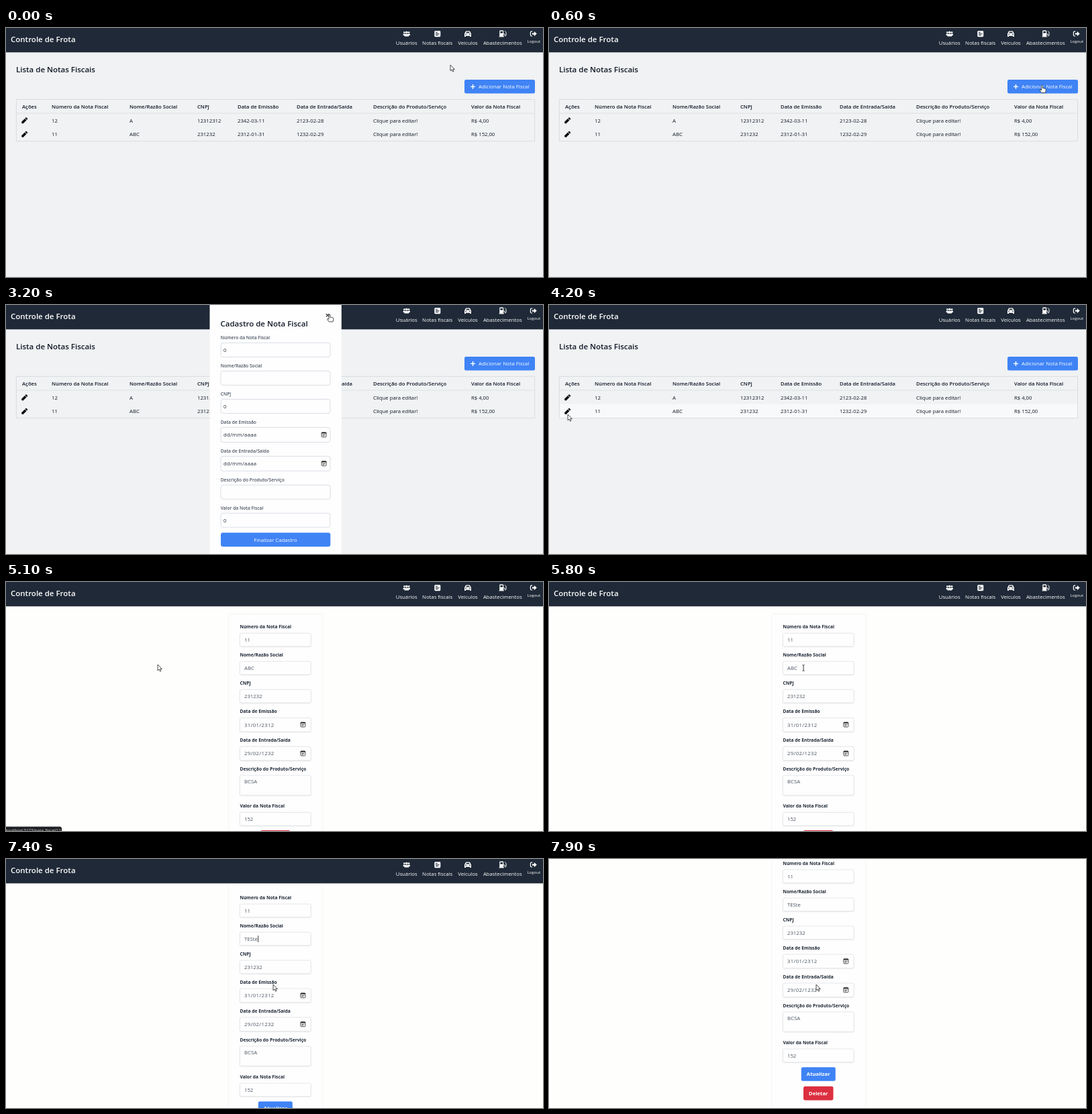
Recreate the animation shown at these times as an HTML page with a canvas. Size 800 by 371 pixels, loop 8 s.

```html
<!DOCTYPE html>
<html lang="pt-BR">
<head>
<meta charset="utf-8">
<title>Controle de Frota</title>
<style>
html, body { margin: 0; width: 100%; height: 100%; overflow: hidden; background: #f0f2f3; }
canvas { display: block; width: 800px; height: 371px; }
</style>
</head>
<body>
<canvas id="stage" width="800" height="371"></canvas>
<script>
const c = document.getElementById('stage').getContext('2d');
const LOOP = 8000, STEP = 100;
const OPEN = 700, CLOSE = 3400, EDIT = 5000, DIRTY = 6300;
const INK = '#111827', NAVY = '#1f2937', BLUE = '#3f83f5', RED = '#dc2f40', GREY = '#4b5563';

const LABELS = ['Número da Nota Fiscal', 'Nome/Razão Social', 'CNPJ', 'Data de Emissão',
  'Data de Entrada/Saída', 'Descrição do Produto/Serviço', 'Valor da Nota Fiscal'];
const COLS = [24, 68, 184, 285, 345, 433, 547, 693];
const ROWS = [
  ['12', 'A', '12312312', '2342-03-11', '2123-02-28', 'Clique para editar!', 'R$ 4,00'],
  ['11', 'ABC', '231232', '2312-01-31', '1232-02-29', 'Clique para editar!', 'R$ 152,00']
];

// time, x, y, pointer shape
const POINTER = [
  [0, 662, 55, 'arrow'], [400, 733, 84, 'hand'], [700, 735, 86, 'arrow'], [900, 690, 112, 'arrow'],
  [1600, 384, 259, 'arrow'], [1800, 380, 296, 'arrow'], [2000, 380, 296, 'arrow'],
  [2300, 400, 325, 'arrow'], [2700, 440, 190, 'arrow'], [3000, 442, 180, 'arrow'],
  [3200, 482, 14, 'hand'], [3400, 482, 14, 'arrow'], [3800, 70, 135, 'arrow'],
  [4200, 28, 163, 'arrow'], [4300, 28, 157, 'hand'], [4900, 28, 157, 'arrow'],
  [5100, 226, 123, 'arrow'], [5600, 388, 128, 'ibeam'], [5900, 376, 128, 'ibeam'],
  [6100, 300, 130, 'arrow'], [6300, 351, 155, 'ibeam'], [6400, 354, 161, 'ibeam'],
  [6800, 357, 164, 'ibeam'], [7100, 390, 180, 'arrow'], [7400, 398, 187, 'arrow']
];
const TYPING = [[0, 'ABC'], [DIRTY, 'T'], [6800, 'TE'], [6900, 'TES'], [7100, 'TESt'], [7300, 'TESte']];
const SCROLL = [[0, 0], [7700, 17], [7800, 38], [7900, 51]];

const latest = (list, t) => list.filter(k => k[0] <= t).pop();

function pointerAt(t) {
  const a = latest(POINTER, t), b = POINTER[POINTER.indexOf(a) + 1] || a;
  const p = (t - a[0]) / (b[0] - a[0] || 1), e = p * p * (3 - 2 * p);
  return { x: a[1] + (b[1] - a[1]) * e, y: a[2] + (b[2] - a[2]) * e, shape: a[3] };
}

function text(s, x, y, { size = 7.75, weight = 400, color = INK, align = 'left', gap = 0 } = {}) {
  c.font = `${weight} ${size}px "Open Sans", "Noto Sans", sans-serif`;
  c.letterSpacing = gap + 'px';
  c.textAlign = align;
  c.fillStyle = color;
  c.fillText(s, x, y + size * 0.36);
}

function rect(x, y, w, h, color) {
  c.fillStyle = color;
  c.fillRect(x, y, w, h);
}

function box(x, y, w, h, r, fill, line) {
  c.beginPath();
  c.roundRect(x, y, w, h, r);
  if (fill) { c.fillStyle = fill; c.fill(); }
  if (line) { c.strokeStyle = line; c.lineWidth = 0.8; c.stroke(); }
}

function dot(x, y, r, color = '#fff') {
  c.fillStyle = color;
  c.beginPath();
  c.arc(x, y, r, 0, 7);
  c.fill();
}

function shape(d, x, y, fill, line, width = 0.8) {
  const path = new Path2D(d);
  c.save();
  c.translate(x, y);
  if (fill) { c.fillStyle = fill; c.fill(path); }
  if (line) { c.strokeStyle = line; c.lineWidth = width; c.stroke(path); }
  c.restore();
}

function navIcons() {
  for (const [x, r] of [[593.4, 1.3], [600.2, 1.3], [596.8, 1.9]]) dot(x, 6.6, r);
  box(591.6, 8.5, 3.2, 2.6, [1.4, 1, 0, 0], '#fff');
  box(598.8, 8.5, 3.2, 2.6, [1, 1.4, 0, 0], '#fff');
  box(593.4, 9, 6.8, 3.6, [2, 2, 0.6, 0.6], '#fff');

  box(638.3, 4.2, 9, 9, 1.4, '#fff');
  rect(640, 6.2, 3, 1, NAVY);
  rect(640, 8.2, 5.6, 1, NAVY);
  rect(640, 10.2, 4, 1, NAVY);

  shape('M0 4.2 L1.6 .8 Q2 0 3 0 H7 Q8 0 8.4 .8 L10 4.2 V8.6 H8 V7.4 H2 V8.6 H0 Z', 683, 4.4, '#fff');
  shape('M2.2 3 L3 1.3 H7 L7.8 3 Z', 683, 4.4, NAVY);
  dot(685, 9.4, 0.8, NAVY);
  dot(691, 9.4, 0.8, NAVY);

  box(735.2, 3.6, 6, 9, [1.2, 1.2, 0, 0], '#fff');
  rect(734.6, 12.2, 7.2, 1.2, '#fff');
  rect(736.4, 5, 3.6, 2.6, NAVY);
  shape('M0 5 H1 Q2 5 2 6 V7 Q2 8 3 8 Q4 8 4 7 V2.6 L2 .6', 741, 3.8, null, '#fff', 1);

  shape('M3.4 .6 H2 Q.6 .6 .6 2 V6 Q.6 7.4 2 7.4 H3.4', 780.8, 4.6, null, '#fff', 1.2);
  shape('M3 2.8 H6 V.4 L10 4 L6 7.6 V5.2 H3 Z', 780.8, 4.6, '#fff');
}

function header() {
  rect(0, 0, 800, 36.3, NAVY);
  text('Controle de Frota', 7, 16.6, { size: 11.5, weight: 600, color: '#fff' });
  const nav = { color: '#fff', align: 'center' };
  text('Usuários', 596.7, 22, nav);
  text('Notas fiscais', 642.7, 22, nav);
  text('Veículos', 688, 22, nav);
  text('Abastecimentos', 739.8, 22, nav);
  text('Logout', 786.3, 20.2, { ...nav, size: 6.1 });
  navIcons();
}

function pencil(x, y) {
  c.save();
  c.translate(x, y);
  c.rotate(-Math.PI / 4);
  shape('M-5.8 0 L-4.8 -1.8 H2.3 V1.8 H-4.8 Z M3 -1.8 H4.3 Q5.2 -1.8 5.2 -.9 V.9 Q5.2 1.8 4.3 1.8 H3 Z', 0, 0, '#0b0d12');
  c.restore();
}

function listPage(hover) {
  rect(0, 0, 800, 371, '#f0f2f3');
  header();
  text('Lista de Notas Fiscais', 15, 61.8, { size: 11.5, weight: 600 });
  box(683, 77, 105, 20.6, 2.4, BLUE);
  rect(692, 86.7, 7, 1.4, '#fff');
  rect(694.8, 83.9, 1.4, 7, '#fff');
  text('Adicionar Nota Fiscal', 704, 87.6, { color: '#fff' });

  if (hover >= 0) rect(15, 127 + 20.8 * hover, 773, 20.8, '#f8f9fa');
  box(15.4, 106.4, 772.2, 62.2, 0, null, '#d3d6da');
  rect(15, 126.6, 773, 0.8, '#d9dcdf');
  ['Ações', ...LABELS].forEach((s, i) => text(s, COLS[i], 117, { weight: 600, size: 7.7 }));
  ROWS.forEach((row, r) => {
    const y = 137.8 + 20.5 * r;
    pencil(27.6, y);
    row.forEach((s, i) => text(s, COLS[i + 1], y));
  });
}

function calendar(x, y) {
  box(x - 3.5, y - 3.4, 7, 7, 1.2, null, '#222');
  rect(x - 3.5, y - 3.4, 7, 1.6, '#222');
  rect(x - 2, y - 0.5, 4, 0.8, '#222');
  rect(x - 2, y + 1.2, 2.8, 0.8, '#222');
}

function modal() {
  rect(303.5, 0, 196.3, 371, '#fefefe');
  shape('M0 0 L4.6 4.6 M4.6 0 L0 4.6', 476.8, 13, null, '#4a4f57', 1.4);
  text('Cadastro de Nota Fiscal', 319.5, 28.2, { size: 11.5, weight: 600 });
  const values = ['0', '', '0', 'dd/mm/aaaa', 'dd/mm/aaaa', '', '0'];
  let y = 49;
  LABELS.forEach((label, i) => {
    const date = i === 3 || i === 4, h = date ? 22 : 21;
    text(label, 319.7, y, { size: 6.7, weight: 600, color: GREY });
    box(320, y + 7.4, 163, h, 3, '#fefefe', '#d0d7e0');
    text(values[i], 324, y + 7.6 + h / 2, { color: '#1f2937', gap: date ? 0.25 : 0 });
    if (date) calendar(473.6, y + 7.2 + h / 2);
    y += date ? 42.9 : 42;
  });
  box(320, 339.3, 163.3, 20.6, 3, BLUE);
  text('Finalizar Cadastro', 401.5, 349.8, { color: '#fff', align: 'center' });
}

function button(s, y, w, color) {
  box(401.3 - w / 2, y, w, 20.6, 2.4, color);
  text(s, 401.3, y + 10.4, { color: '#fff', weight: 700, size: 7.7, align: 'center' });
}

function nameField(name, y, t) {
  const picked = t >= 6000 && t < DIRTY;
  c.font = '400 7.75px "Open Sans", "Noto Sans", sans-serif';
  c.letterSpacing = '0px';
  const w = c.measureText(name).width;
  if (picked) rect(355, y - 5.5, w, 11, '#2b78e4');
  text(name, 355, y, { color: picked ? '#fff' : GREY });
  if (t >= DIRTY && t < 7800) rect(355.4 + w, y - 5, 0.8, 10, '#111');
}

function editPage(t, mouse) {
  const dirty = t >= DIRTY, top = dirty ? -9.2 : 0;
  rect(0, 0, 800, 371, '#fefefd');
  c.save();
  c.translate(0, -latest(SCROLL, t)[1]);
  box(331.6, 47.5 + top, 140.2, 400, 3, '#fefefe', '#f1f1f0');
  header();
  const values = ['11', latest(TYPING, t)[1], '231232', '31/01/2312', '29/02/1232', 'BCSA', '152'];
  let y = 67 + top;
  LABELS.forEach((label, i) => {
    const date = i === 3 || i === 4, h = i === 5 ? 29.6 : date ? 20.6 : 19.6;
    text(label, 348.4, y, { size: 6.75, weight: 700, color: NAVY });
    c.save();
    c.shadowColor = 'rgba(0,0,0,.16)';
    c.shadowBlur = 2;
    c.shadowOffsetY = 0.6;
    box(348.5, y + 9.3, 105.6, h, 2, '#fefefe');
    c.restore();
    box(348.5, y + 9.3, 105.6, h, 2, null, '#e1e4e8');
    const mid = y + (i === 5 ? 18.8 : 9.5 + h / 2);
    if (i === 1) nameField(values[i], mid, t);
    else text(values[i], 355, mid, { color: GREY, gap: date ? 0.35 : 0 });
    if (date) calendar(442.4, mid - 0.4);
    if (i === 2 && dirty && mouse.x > 348 && Math.abs(mouse.y - mid) < 10) {
      shape('M0 2 L2 0 L4 2 Z M0 5 L2 7 L4 5 Z', 441.8, mid - 3.6, '#555');
    }
    y += i === 5 ? 55.2 : date ? 42.9 : 42;
  });
  if (dirty) {
    button('Atualizar', 361.2, 51, BLUE);
    button('Deletar', 389.8, 44.5, RED);
  } else {
    button('Deletar', 370, 44.5, RED);
  }
  c.restore();
}

function linkStatus() {
  box(-4, 364.6, 87, 12, [0, 3, 0, 0], '#202124');
  text('localhost:5173/nota_fiscal/11', -0.5, 370, { size: 6.1, color: '#e4e6e8' });
}

function pointer({ x, y, shape: kind }) {
  if (kind === 'arrow') {
    shape('M0 0 V8.8 L2 7 L3.5 10.2 L5 9.5 L3.6 6.5 H6.3 Z', x, y, '#fff', '#222');
  } else if (kind === 'hand') {
    shape('M-1 .8 Q0 -.6 1 .8 V4.4 L2.4 4.2 L3.8 4.6 L5.4 5.2 Q6 5.6 5.8 7.4 L5 11 H-.8 L-3.4 7.4 Q-3.6 6 -2.4 6.2 L-1 7.4 Z',
      x, y, '#fff', '#222');
  } else {
    shape('M-1.6 -4.4 Q0 -4.4 0 -3.6 Q0 -4.4 1.6 -4.4 M0 -3.6 V3.6 M-1.6 4.4 Q0 4.4 0 3.6 Q0 4.4 1.6 4.4',
      x, y, null, '#222', 0.9);
  }
}

function draw(t) {
  const mouse = pointerAt(t), isOpen = t >= OPEN && t < CLOSE;
  if (t < EDIT) {
    const row = Math.floor((mouse.y - 127) / 20.8);
    listPage(!isOpen && mouse.x < 788 && (row === 0 || row === 1) ? row : -1);
    if (isOpen) modal();
  } else {
    editPage(t, mouse);
  }
  if (t >= 4600 && t < 5400) linkStatus();
  pointer(mouse);
}

function tick() {
  draw(Math.floor(performance.now() % LOOP / STEP) * STEP);
  requestAnimationFrame(tick);
}
tick();
</script>
</body>
</html>
```
